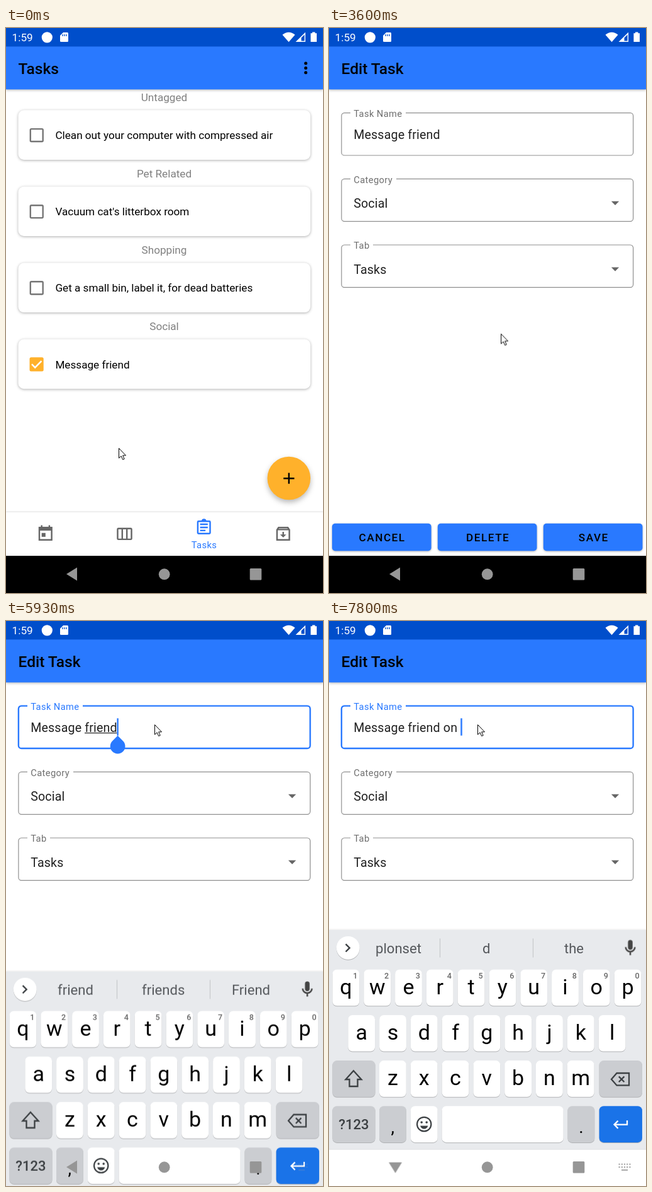
These frames come from a looping animation (504x896 px, 8000 ms). An HTML page:

```html
<!DOCTYPE html>
<html lang="en">
<head>
<meta charset="utf-8">
<title>Task editor</title>
<style>
  html, body { margin: 0; width: 100%; height: 100%; overflow: hidden; background: #fff; }
  svg { display: block; width: 100vw; height: 100vh; }
  text { font: 17.15px Roboto, sans-serif; fill: #000; white-space: pre; }
  .mid { text-anchor: middle; }
  .title { font-size: 24.5px; font-weight: 500; }
  .head { fill: #808080; }
  .input { font-size: 19.6px; letter-spacing: .18px; fill: #212121; }
  .rest { font-size: 19.6px; fill: #757575; }
  .label { font-size: 14.7px; letter-spacing: .4px; fill: #6f6f6f; }
  .blue { fill: #2979ff; }
  .button { font-weight: 500; letter-spacing: 1.53px; }
  .letter { font-size: 34px; }
  .hint { font-size: 12.5px; font-weight: 500; fill: #666; }
  .word { font-size: 22.05px; fill: #55585c; }
  .sym { font-size: 22px; font-weight: 500; fill: #3c4043; }
  .line { fill: none; stroke-width: 2; stroke: currentColor; }
  .card { fill: #fff; filter: drop-shadow(0 1px 2px rgba(0,0,0,.32)); }
  .raised { fill: #2979ff; filter: drop-shadow(0 1.5px 1.5px rgba(0,0,0,.3)); }
  .key { filter: drop-shadow(0 1px .4px rgba(0,0,0,.24)); }
  #back { transform-origin: 105.5px 866px; }
</style>
</head>
<body>
<svg id="stage" viewBox="0 0 504 896" preserveAspectRatio="none"></svg>
<script>
const LOOP = 8000, TICK = 200 / 3;

// Drawing helpers. "on" lists the times at which a part appears and disappears.
const text = (x, y, cls, str, attrs = '') => `<text x="${x}" y="${y}" class="${cls}" ${attrs}>${str}</text>`;
const rect = (x, y, w, h, r, attrs = '') => `<rect x="${x}" y="${y}" width="${w}" height="${h}" rx="${r}" ${attrs}/>`;
const line = (d, attrs = '') => `<path class="line" d="${d}" ${attrs}/>`;
const on = (times, body) => `<g data-on="${times}">${body}</g>`;
const icon = (x, y, color, body) =>
  `<g transform="translate(${x - 14.7} ${y - 14.7}) scale(1.225)" color="${color}" fill="${color}">${body}</g>`;

function statusBar() {
  return rect(0, 0, 504, 29.4, 0, 'fill="#004ecb"') +
    text(9.6, 21, '', '1:59', 'style="fill:#fff"') +
    `<g fill="#fff"><circle cx="65.3" cy="14.8" r="8.6"/>
      <path d="M91 7h6.5q1.5 0 1.5 1.5v12q0 1.5-1.5 1.5h-10q-1.5 0-1.5-1.5V12z"/>
      <path d="M439.5 10.7q10-8 20 0L449.5 22.3z"/>
      <path d="M476 6.8V22h-15.5zm-1.4 3.6L469.5 15.4v5.2h5.1z" fill-rule="evenodd"/>
      <path d="M487 6.6h4.4v1.6h2.6V22h-9.6V8.2h2.6z"/></g>
    <path d="M90 10v3m3-3v3m3-3v3" stroke="#004ecb" stroke-width="1.3"/>`;
}

function taskCard(i, head, label) {
  const y = 130.3 + i * 121.1, c = y + 39.6;
  const box = i < 3
    ? rect(38.8, c - 9.8, 19.9, 19.9, 1.5, 'fill="none" stroke="#757575" stroke-width="2.4"')
    : rect(37.5, c - 11, 22.2, 22.2, 2.5, 'fill="#ffb12b"') +
      line(`M41 ${c}l5.2 5.3 10.2-10.4`, 'color="#fff" style="stroke-width:2.5"');
  return text(251.5, y - 14.3, 'head mid', head) + rect(19.5, y, 464.5, 78.6, 9, 'class="card"') +
    box + text(78.4, c + 6.3, '', label);
}

function listPage() {
  const gray = '#666';
  return text(19.6, 73, 'title', 'Tasks') +
    [56, 63.4, 70.8].map(y => `<circle cx="476.6" cy="${y}" r="2.5"/>`).join('') +
    [['Untagged', 'Clean out your computer with compressed air'],
     ['Pet Related', "Vacuum cat's litterbox room"],
     ['Shopping', 'Get a small bin, label it, for dead batteries'],
     ['Social', 'Message friend']].map((t, i) => taskCard(i, ...t)).join('') +
    `<circle cx="449.8" cy="714" r="34.3" fill="#ffb12b" style="filter:drop-shadow(0 4px 4px rgba(0,0,0,.28))"/>` +
    line('M441.2 714.2h17.2m-8.6-8.6v17.2', 'style="stroke-width:2.45"') +
    rect(0, 768, 504, 69, 0, 'fill="#fff" style="filter:drop-shadow(0 -1px 1px rgba(0,0,0,.13))"') +
    icon(62.8, 802, gray, line('M4 4h16v16H4zM7 1v3m10-3v3') + rect(4, 4, 16, 4, 0) + rect(7, 11, 5, 5, 0)) +
    icon(188.5, 802.3, gray, rect(3, 5, 18, 14, 1, 'class="line"') + line('M9 5v14m6-14v14')) +
    icon(314.7, 792, '#2979ff', rect(4, 4, 16, 16, 1, 'class="line"') +
      line('M7 8h10M7 12h10M7 16h7') + '<path d="M8.8 4a3.2 3.2 0 0 1 6.4 0z"/>') +
    icon(440.7, 802, gray, line('M4 7v13h16V7L18 4H6zM4 6.6h16M12 9.5v5') + '<path d="M8 13h8l-4 4z"/>') +
    text(315, 824.5, 'label mid', 'Tasks', 'style="fill:#2979ff"');
}

const outline = (y, notch) => `M${notch} ${y}H479a4.6 4.6 0 0 1 4.6 4.6v58.2a4.6 4.6 0 0 1-4.6 4.6` +
  `H24.5a4.6 4.6 0 0 1-4.6-4.6v-58.2a4.6 4.6 0 0 1 4.6-4.6H34`;

function field(i, label, value, notch) {
  const y = 134.6 + i * 104.7, frame = outline(y, notch), first = i === 0;
  const until = first ? ' 5670' : '';
  let out = on('2670' + until, line(frame, 'color="#8f8f8f" style="stroke-width:1.2"')) +
    on('2670 2730', text(39.2, y + 40, 'rest', label)) +
    on('2730' + until, text(39.2, y + 6.2, 'label', label));
  if (first) {
    out += on('5670', line(frame, 'color="#2979ff" style="stroke-width:2.4"') +
      text(39.2, y + 6.2, 'label blue', label));
  } else {
    out += `<path d="M448.8 ${y + 35.5}h12.4l-6.2 6.2z" fill="#666"/>` + text(39.2, y + 45.9 - .2, 'input', value);
  }
  return out;
}

function typedName() {
  const states = [['2670 7200', ''], ['7200 7470', ' o'], ['7470', ' on']];
  const under = (x, w, times) => rect(x, 177, w, 1.2, 0, `data-on="${times}" fill="#212121"`);
  return states.map(([t, tail]) => on(t, text(39.2, 176, 'input', 'Message friend' + tail))).join('') +
    under(125, 51.5, '5870 7000') + under(182, 11, '7200 7470') + under(182, 22, '7470 7800') +
    `<g id="caret">${rect(176.4, 154.3, 2.4, 27.4, 0, 'data-on="5670 6270 6800" fill="#2979ff"')}</g>` +
    on('5870 7000', '<path d="M177.6 181.8l8.4 8.4a11.9 11.9 0 1 1-16.8 0z" fill="#2979ff"/>');
}

function editPage() {
  const buttons = [['CANCEL', 4.9, 84.6], ['DELETE', 172.8, 252.7], ['SAVE', 340.8, 420.8]];
  return text(19.6, 73, 'title', 'Edit Task') +
    field(0, 'Task Name', '', 122) + field(1, 'Category', 'Social', 107) + field(2, 'Tab', 'Tasks', 70) +
    typedName() +
    buttons.map(([s, x, c]) => rect(x, 785.7, 157.7, 43.5, 5, 'class="raised"') + text(c, 814, 'button mid', s)).join('');
}

function key(x, row, w = 42.8, fill = '#fff') {
  return rect(x, 552.7 + row * 72.2, w, 57.6, 7, `class="key" fill="${fill}"`);
}

function keyboard() {
  const pitch = 49.8, dim = '#cbcdd1';
  const letters = ['qwertyuiop', 'asdfghjkl', 'zxcvbnm'].map((row, r) => [...row].map((ch, i) => {
    const x = [5.5, 30.3, 80][r] + i * pitch;
    return key(x, r) + text(x + 21.4, 591.6 + r * 72.2, 'letter mid', ch) +
      (r ? '' : text(x + 36.3, 567, 'hint mid', (i + 1) % 10));
  }).join('')).join('');
  const words = [
    ['0 7070', 'friend', 'friends', 'Friend'],
    ['7070 7270', 'and', 'on', 'for'],
    ['7270 7470', 'of', 'o', 'or'],
    ['7470 7800', 'on', 'one', 'only'],
    ['7800', 'plonset', 'd', 'the'],
  ].map(([t, ...list]) => on(t, list.map((s, i) => text([110.5, 250.2, 389.5][i], 527, 'word mid', s)).join(''))).join('');
  return rect(0, 490, 504, 420, 0, 'fill="#e8eaed" style="filter:drop-shadow(0 -1px 1px rgba(0,0,0,.08))"') +
    rect(0, 838, 504, 500, 0, 'fill="#fff"') + rect(0, 837.5, 504, 1, 0, 'fill="#e0e1e3"') +
    '<circle cx="30.3" cy="518.4" r="18.5" fill="#fff" class="key"/>' +
    line('M26.6 512.3l6.1 6.1-6.1 6.1', 'color="#3c4043" style="stroke-width:2.4"') +
    line('M176.5 503.5v30M324.5 503.5v30', 'color="#c6c8cc" style="stroke-width:1.2"') + words +
    icon(479, 518.8, '#444', rect(9, 1.5, 6, 12.5, 3) + line('M6 10.5a6 6 0 0 0 12 0M12 16.5v4.5')) +
    letters +
    key(5.5, 2, 68, dim) + key(429.6, 2, 68.3, dim) +
    line('M39 713.3L51.5 727h-6v11h-13v-11h-6z', 'color="#3c4043" style="stroke-width:2.3"') +
    line('M449 726.7l8.5-9.7h19.5v19.4h-19.5zM460.8 722.4l8.6 8.6m0-8.6l-8.6 8.6', 'color="#3c4043" style="stroke-width:2.3"') +
    key(5.5, 3, 68, dim) + key(80, 3, 42.8, dim) + key(129.9, 3) + key(179.5, 3, 193.2) +
    key(379.5, 3, 42.8, dim) + key(429.6, 3, 68.3, '#1a73e8') +
    text(39.3, 806, 'sym mid', '?123') +
    text(101.3, 811.5, 'mid', ',', 'style="font-size:28px"') + text(401, 811.5, 'mid', '.', 'style="font-size:28px"') +
    '<circle cx="151.2" cy="798" r="11.2" class="line" style="stroke-width:2.2" color="#3c4043"/>' +
    '<g fill="#3c4043"><circle cx="147.2" cy="795" r="1.8"/><circle cx="155.2" cy="795" r="1.8"/>' +
    '<path d="M145 800.5h12.4q-1.8 5-6.2 5t-6.2-5z"/></g>' +
    line('M474 792v6.6h-20.5m6-6l-6 6 6 6', 'color="#fff" style="stroke-width:2.3"');
}

function navIcons() {
  return `<g fill="#969696"><path id="back" d="M96 866l17-10.4v20.8z"/><circle cx="251.7" cy="866.2" r="8.9"/>
    ${rect(387.7, 857, 18.6, 18.4, 1.5)}</g>
    <g id="switcher">${line('M460.5 861.5h19M460.5 866h19', 'color="#a4a4a4" stroke-dasharray="2.2 2"')}
    ${line('M465 870.7h10', 'color="#a4a4a4"')}</g>`;
}

const stage = document.getElementById('stage');
stage.innerHTML = rect(0, 0, 504, 896, 0, 'fill="#fff"') +
  rect(0, 29, 504, 68.4, 0, 'fill="#2979ff" style="filter:drop-shadow(0 1px 2px rgba(0,0,0,.3))"') +
  statusBar() + on('0 2670', listPage()) + on('2670', editPage()) +
  rect(0, 837, 504, 59, 0) + `<g id="keyboard">${keyboard()}</g>` + navIcons() +
  `<path id="cursor" d="M.5.5v15.6l3.6-3.3 2.6 5.7 2.5-1.1-2.6-5.5h4.9z" fill="#fff" stroke="#000"/>`;

// Plays a table of [time, value] as hard steps.
function play(el, prop, table) {
  const rows = [...table, [LOOP, table[table.length - 1][1]]];
  el.animate(rows.map(([t, v]) => ({ offset: t / LOOP, [prop]: v, easing: 'step-end' })),
    { duration: LOOP, iterations: Infinity });
}
const move = (x, y) => `translate(${x.toFixed(1)}px, ${y.toFixed(1)}px)`;
const ease = p => p * p * (3 - 2 * p);

// Pointer positions from one point to another, one per tick.
function glide(start, count, [x0, y0], [x1, y1]) {
  return Array.from({ length: count }, (_, i) => {
    const p = ease((i + 1) / count);
    return [start + i * TICK, move(x0 + (x1 - x0) * p, y0 + (y1 - y0) * p)];
  });
}

for (const el of stage.querySelectorAll('[data-on]')) {
  const times = el.dataset.on.split(' ').map(Number);
  const table = times.map((t, i) => [t, i % 2 ? 0 : 1]);
  play(el, 'opacity', times[0] ? [[0, 0], ...table] : table);
}

const byId = id => document.getElementById(id);
play(byId('cursor'), 'transform', [
  [0, move(179, 666)],
  ...glide(1270, 10, [179, 666], [274, 529]),
  [3200, move(277, 527)], [3270, move(280.5, 525)],
  ...glide(3470, 9, [280.5, 525], [222, 205]),
  ...glide(3470 + 9 * TICK, 4, [222, 205], [234, 168]),
  [4330, move(236, 164)],
]);
play(byId('caret'), 'transform',
  [[0, 0], [7000, 5], [7200, 16.4], [7470, 27.4], [7600, 32.5]].map(([t, x]) => [t, move(x, 0)]));
play(byId('keyboard'), 'transform',
  [[0, 420], [5800, 310], [5870, 165], [5930, 65.7], [6000, 24], [6070, 6], [6130, 0]].map(([t, y]) => [t, move(0, y)]));
play(byId('back'), 'transform',
  [[0, 0], [6000, -18], [6070, -50], [6130, -76], [6200, -90]].map(([t, a]) => [t, `rotate(${a}deg)`]));
play(byId('switcher'), 'opacity', [[0, 0], [5930, .2], [6000, .5], [6070, .8], [6130, 1]]);
</script>
</body>
</html>
```
